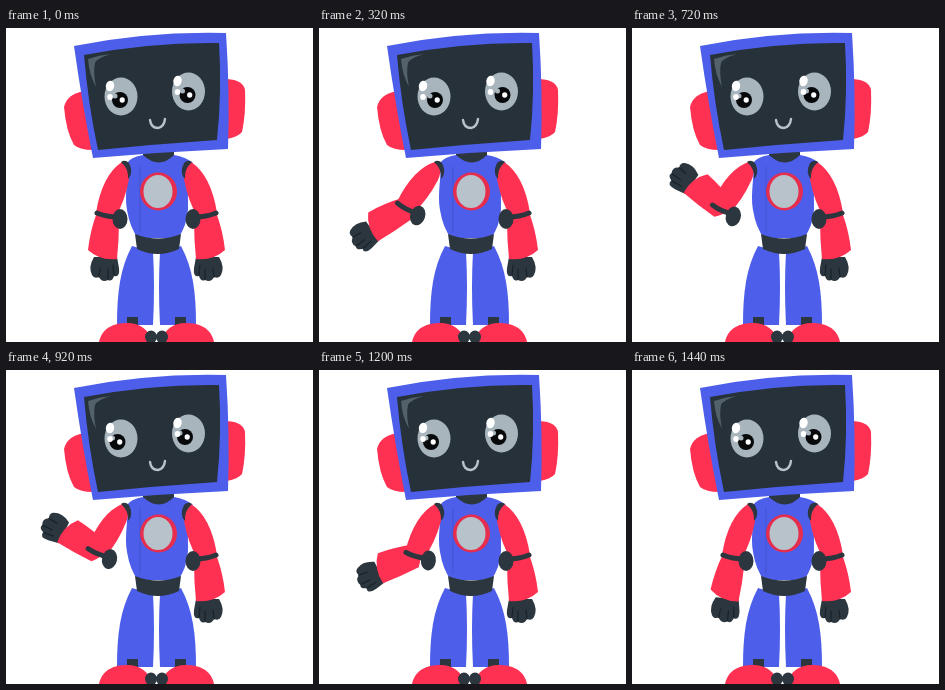
An HTML page with a canvas that plays this animation: 307x314 px, repeating every 1.48 s.

```html
<!DOCTYPE html>
<html lang="en">
<head>
<meta charset="utf-8">
<title>Waving robot</title>
<style>
html, body { margin: 0; width: 100%; height: 100%; overflow: hidden; background: #fff; }
canvas { display: block; width: 307px; height: 314px; }
</style>
</head>
<body>
<canvas id="stage" width="307" height="314"></canvas>
<script>
const ctx = document.getElementById('stage').getContext('2d');
const BLUE = '#4d5eea', RED = '#ff3152', DARK = '#2b363e', LINE = '#182229', GREY = '#b8c2cb';
const LOOP = 1480, STEP = 40;
const SHOULDER = [118, 138], ELBOW = [103, 188];

// time, upper arm angle, forearm angle, pupil shift
const KEYS = [
  [0, 0, 0, 0], [320, 17, 54, 2], [520, 19, 136, -0.5], [720, 14, 125, -2],
  [920, 11.5, 116, -2.5], [1200, 5, 63, -2], [1440, 0, 6, 0], [1480, 0, 0, 0]
];

function slope(i, c) {
  if (i === 0 || i === KEYS.length - 1) return 0;
  const a = KEYS[i - 1], b = KEYS[i + 1];
  return (b[c] - a[c]) / (b[0] - a[0]);
}

function sample(t, c) {
  let i = 0;
  while (i < KEYS.length - 2 && t >= KEYS[i + 1][0]) i++;
  const a = KEYS[i], b = KEYS[i + 1], span = b[0] - a[0], u = (t - a[0]) / span;
  const ease = u * u * (3 - 2 * u);
  return a[c] + (b[c] - a[c]) * ease +
    span * (slope(i, c) * u * (1 - u) ** 2 - slope(i + 1, c) * u * u * (1 - u));
}

function fill(d, color) {
  ctx.fillStyle = color;
  ctx.fill(new Path2D(d));
}

function stroke(d, color, width) {
  ctx.strokeStyle = color;
  ctx.lineWidth = width;
  ctx.stroke(new Path2D(d));
}

function oval(x, y, rx, ry, color, turn = 0) {
  ctx.fillStyle = color;
  ctx.beginPath();
  ctx.ellipse(x, y, rx, ry, turn, 0, Math.PI * 2);
  ctx.fill();
}

function rotateAt([x, y], degrees) {
  ctx.translate(x, y);
  ctx.rotate(degrees * Math.PI / 180);
  ctx.translate(-x, -y);
}

function mirrored(draw) {
  draw();
  ctx.save();
  ctx.translate(301, 0);
  ctx.scale(-1, 1);
  draw();
  ctx.restore();
}

function arm(upper, fore) {
  ctx.save();
  rotateAt(SHOULDER, upper);
  ctx.save();
  rotateAt(ELBOW, fore - upper);
  fill('M88 229Q82 239 86 247Q88 251 93 249Q96 255 102 252Q106 254 108 248Q114 250 113 240L111 229Z', DARK);
  stroke('M93 249L94 240M102 251L102 241M108 247L107 237', LINE, 1.2);
  fill('M90 187Q84 204 82 222Q94 233 111 231Q113 212 113 192Q101 180 90 187Z', RED);
  ctx.restore();
  fill('M116 134Q96 147 90 185Q101 191 109 190Q119 173 123 151Q125 138 116 134Z', RED);
  stroke('M91 185Q100 189 113 189', DARK, 5);
  oval(114, 191, 7.5, 10, DARK);
  ctx.restore();
}

function leg() {
  fill('M126 218C114 240 111 265 111 297L147 297Q149 258 147 224Z', BLUE);
  fill('M121 289H132V299H121Z', DARK);
  fill('M93 314C96 299 109 295 121 295C134 295 143 302 147 314Z', RED);
  oval(145, 309, 6, 6.5, DARK);
}

function torso() {
  fill('M137 124H168V133Q152 140 137 133Z', DARK);
  fill('M137 127Q125 129 121 135C123 148 118 165 121 182Q124 200 132 210H172Q181 198 182 181C182 163 181 150 187 135Q180 129 168 127Q153 142 137 127Z', BLUE);
  stroke('M134 139V204', '#4051c9', 0.8);
  fill('M129 206Q152 215 175 206L173 221Q152 231 131 221Z', DARK);
  oval(152.5, 163.5, 18.5, 19, '#e62d4d');
  oval(152, 163.5, 14.5, 16.5, GREY);
}

function eye(x, y, shift) {
  oval(x, y, 16.5, 19, '#a9b5bd');
  oval(x - 1 + shift, y + 3.5, 8, 8, '#07090b');
  oval(x + 1.2 + shift, y + 3.5, 2.6, 2.7, '#fff');
  oval(x - 6 + shift, y - 0.5, 2.5, 2.5, '#a9b5bd');
  oval(x - 11, y - 10.5, 4.2, 5.3, '#fff', 0.2);
  oval(x - 11, y + 0.5, 2.8, 3, '#fff');
}

function head(shift) {
  fill('M78 63Q61 66 58 79Q60 103 68 117Q74 122 87 122Z', RED);
  fill('M221 51Q237 52 239 62Q240 86 236 104Q232 109 221 111Z', RED);
  fill('M68 18Q143 3 220 5Q224 65 222 121Q155 124 87 130Q76 75 68 18Z', BLUE);
  fill('M78 27Q146 14 213 15Q216 65 211 112Q151 116 92 122Q82 75 78 27Z', '#263139');
  fill('M82 31Q93 27 105 26Q91 30 89 35Q87 44 90 59Q83 46 82 31Z', '#53616a');
  eye(115, 68.5, shift);
  eye(182.5, 63.5, shift);
  stroke('M144 92Q145 100 152 100Q158 99 159 91', GREY, 2.4);
}

function draw(t) {
  ctx.fillStyle = '#fff';
  ctx.fillRect(0, 0, 307, 314);
  ctx.lineCap = 'round';
  mirrored(leg);
  torso();
  arm(sample(t, 1), sample(t, 2));
  ctx.save();
  ctx.translate(301, 0);
  ctx.scale(-1, 1);
  arm(0, 0);
  ctx.restore();
  mirrored(() => fill('M115 134Q119 131 123 135Q128 145 122 151Q123 141 115 134Z', DARK));
  head(sample(t, 3));
}

const start = performance.now();
function tick() {
  const t = (performance.now() - start) % LOOP;
  draw(Math.floor(t / STEP) * STEP);
  requestAnimationFrame(tick);
}
tick();
</script>
</body>
</html>
```
